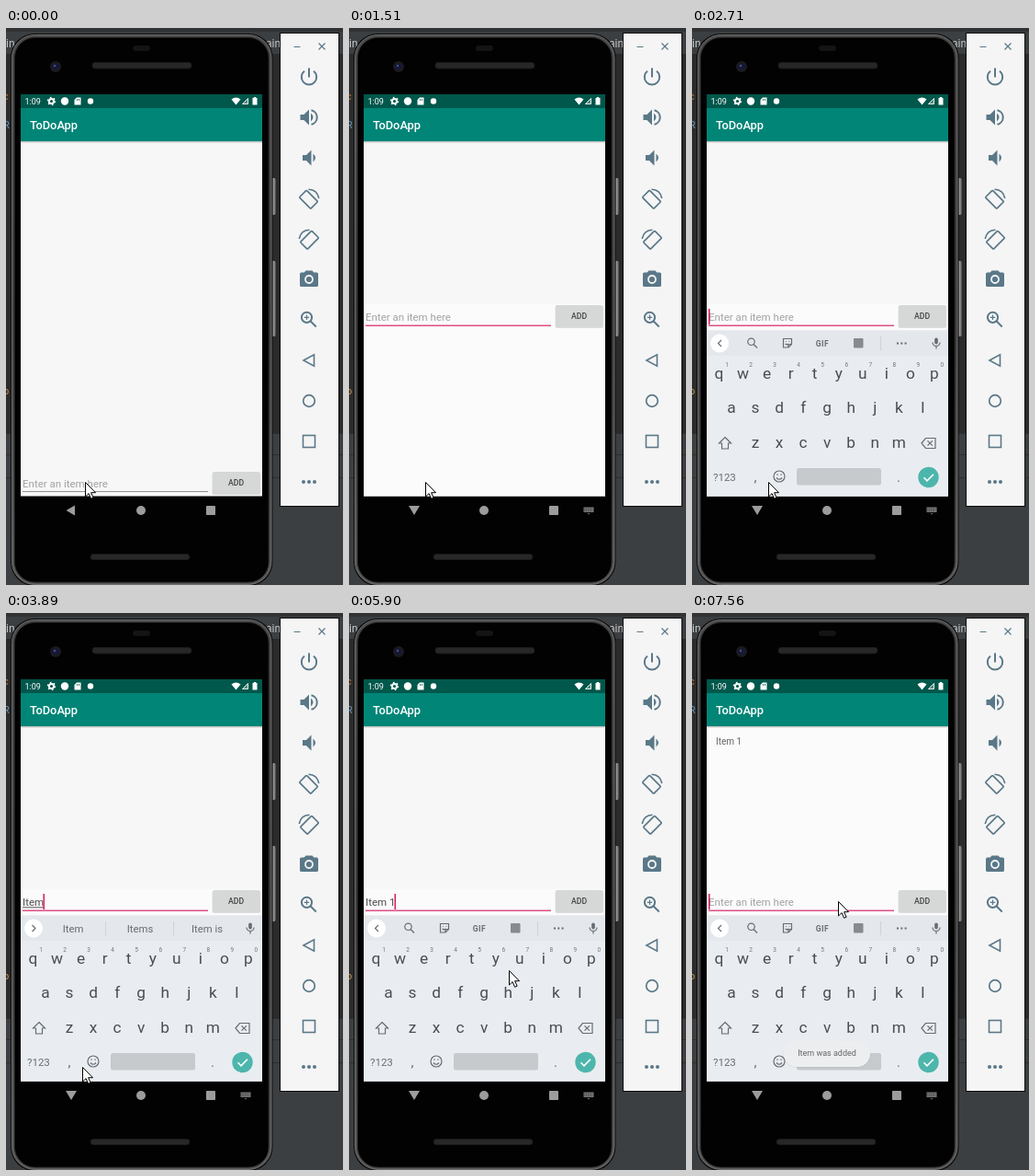
Write an HTML page that moves like this. It is 367 by 605 pixels and loops after 8 s.

```html
<!DOCTYPE html>
<html lang="en">
<head>
<meta charset="utf-8">
<title>To-do list demo</title>
<style>
  html, body { margin: 0; width: 100%; height: 100%; overflow: hidden; background: #3c3f41; }
  svg { display: block; width: 367px; height: 605px; }
  text { font-family: Roboto, "Noto Sans", sans-serif; }
  .mid { text-anchor: middle; }
  .line { fill: none; stroke: currentColor; stroke-width: 2; }
  .thin { fill: none; stroke: currentColor; stroke-width: 1.2; }
  .fill { fill: currentColor; }
  .tools { color: #5a7888; }
  .kb { color: #666d71; }
  .nav { color: #9c9c9c; }
  .code { font: 11px "Noto Sans Mono", monospace; }
</style>
</head>
<body>
<svg viewBox="0 0 367 605">
  <defs>
    <clipPath id="screen"><rect x="16" y="72" width="263" height="436.500"/></clipPath>
    <clipPath id="btn"><rect x="225" y="482" width="51.500" height="24" rx="1.500"/></clipPath>
    <linearGradient id="rim" x2="0" y2="1">
      <stop offset="0" stop-color="#4a4a4a"/><stop offset=".5" stop-color="#3c3c3c"/>
      <stop offset="1" stop-color="#565656"/>
    </linearGradient>
    <linearGradient id="key" x2="1" y2="0">
      <stop offset="0" stop-color="#333"/><stop offset=".6" stop-color="#999"/><stop offset="1" stop-color="#444"/>
    </linearGradient>
    <linearGradient id="drop" x2="0" y2="1">
      <stop offset="0" stop-color="#000" stop-opacity=".25"/><stop offset="1" stop-color="#000" stop-opacity="0"/>
    </linearGradient>
  </defs>

  <!-- editor behind the phone -->
  <rect width="367" height="605" fill="#3c3f41"/>
  <rect y="28" width="367" height="412" fill="#2b2b2b"/>
  <rect width="367" height="4" fill="#303234"/>
  <path d="M0 440.500H367M0 463.500H367M0 488.500H367" stroke="#2c2e30"/>
  <g font-size="12" fill="#c4c6c8">
    <text x="0" y="21">in</text><text x="283" y="21">ain</text>
  </g>
  <g class="code">
    <text x="-3" y="78" fill="#cc7832">c</text>
    <text x="-3" y="109" fill="#6897bb">R</text>
    <text x="-3" y="262" fill="#d04040">.</text>
    <text x="-3" y="398" fill="#cc9a4a">o</text>
  </g>

  <!-- phone body -->
  <rect x="288" y="163" width="6" height="40" rx="2" fill="url(#key)"/>
  <rect x="288" y="253" width="6" height="82" rx="2" fill="url(#key)"/>
  <rect x="5" y="6" width="285.500" height="600" rx="26" fill="#0c0c0c"/>
  <rect x="6.500" y="7.500" width="282.500" height="597" rx="25" fill="url(#rim)" stroke="#6e6e6e"/>
  <rect x="9.500" y="10.500" width="276.500" height="591.500" rx="22" fill="#020202" stroke="#1c1c1c"/>
  <rect x="138" y="19" width="19" height="6" rx="3" fill="#141416"/>
  <circle cx="54" cy="42" r="6" fill="#1b1b1f"/>
  <circle cx="54" cy="42" r="3.500" fill="#15183a"/>
  <circle cx="53" cy="41" r="1.200" fill="#4a5288"/>
  <rect x="94" y="37.500" width="108" height="6.500" rx="3" fill="#272727" stroke="#1a1a1a"/>
  <rect x="92" y="571.500" width="108" height="6" rx="3" fill="#272727" stroke="#1a1a1a"/>

  <!-- app -->
  <g clip-path="url(#screen)">
    <rect x="16" y="72" width="263" height="437" fill="#f7f7f7"/>
    <rect data-on="1230-6710" x="16" y="300" width="263" height="209" fill="#fbfbfb"/>
    <rect data-on="6710-8000" x="16" y="122" width="263" height="387" fill="#fbfbfb"/>
    <rect x="16" y="123" width="263" height="2.500" fill="url(#drop)"/>
    <rect x="16" y="72" width="263" height="15" fill="#00574b"/>
    <rect x="16" y="87" width="263" height="36" fill="#008577"/>
    <g fill="#fff" color="#fff">
      <text x="20.500" y="82.700" font-size="9">1:09</text>
      <circle cx="49.500" cy="79.500" r="2.600" class="line"/>
      <circle cx="49.500" cy="79.500" r="4" class="line" stroke-dasharray="1.600 2.590" style="stroke-width:1.500"/>
      <circle cx="64" cy="79.500" r="4.200"/>
      <path d="M77 75.500h4.500v8h-7v-5.500z"/>
      <path d="M77.500 77v2M79.500 77v2" stroke="#00574b" stroke-width=".8"/>
      <circle cx="92" cy="79.500" r="3.200"/>
      <path d="M245.500 77.500q5-4 10 0l-5 6z"/>
      <path d="M263.500 76.500v6h-6z" fill-opacity=".3" stroke="#fff" stroke-width=".9"/>
      <path d="M268.500 76h1.300v-1h2.400v1h1.300v7.500h-5z"/>
      <text x="26" y="109.700" font-size="12.800" font-weight="500">ToDoApp</text>
    </g>
    <text data-on="6710-8000" x="26" y="142.500" font-size="10" fill="#666">Item 1</text>

    <g id="row">
      <rect data-on="0-560" x="18" y="503" width="202" height="1" fill="#909090"/>
      <rect data-on="560-8000" x="18" y="503.500" width="202" height="1.500" fill="#de4f85"/>
      <text data-on="0-3240 6710-8000" x="18" y="499" font-size="11.500" fill="#a3a3a3">Enter an item here</text>
      <g font-size="11.500" fill="#4c4c4c">
        <text data-on="3240-4940" x="18" y="499">Item</text>
        <text data-on="4940-6710" x="18" y="499">Item 1</text>
        <rect data-on="3240-4820" x="18" y="500.300" width="23" height="1" fill="#555"/>
      </g>
      <rect id="caret" y="486" width="1.500" height="17" fill="#d81b60"/>
      <rect x="224.500" y="483" width="52.500" height="24" rx="2" fill="#000" opacity=".12"/>
      <rect x="225" y="482" width="51.500" height="24" rx="1.500" fill="#d6d7d7"/>
      <g clip-path="url(#btn)"><circle id="ripple" cx="251" cy="494.500" fill="#000" opacity=".07"/></g>
      <text class="mid" x="250.500" y="497.200" font-size="8.700" font-weight="500" fill="#444">ADD</text>
    </g>

    <g id="kb" class="kb">
      <rect x="16" y="328.500" width="263" height="181" fill="#e9edf1"/>
      <rect x="16" y="328.500" width="263" height="27.500" fill="#e4e7eb"/>
      <circle cx="30" cy="342.500" r="10" fill="#fff"/>
      <path data-on="0-3240 4820-8000" class="thin" d="M32 339l-3.500 3.500 3.500 3.500"/>
      <path data-on="3240-4820" class="thin" d="M28.500 339l3.500 3.500-3.500 3.500"/>
      <g data-on="0-3240 4820-8000">
        <circle cx="64.500" cy="340.800" r="3.700" class="thin"/><path class="thin" d="M67 343.500l4 4"/>
        <path class="thin" d="M99.500 337.500h9v6l-3.500 3.500h-5.500zM105 347v-3.500h3.500M102 340.500h.8M105.500 340.500h.8M101.700 343q1.500 1.500 3 0"/>
        <text class="mid fill" x="142" y="345.600" font-size="8.500" font-weight="700" letter-spacing=".5">GIF</text>
        <rect class="fill" x="176" y="337" width="10.500" height="10.500" rx="1" opacity=".75"/>
        <path d="M205.500 335v15" stroke="#cfd3d7"/>
        <path class="fill" d="M223 341.500h2v2h-2zM227.300 341.500h2v2h-2zM231.600 341.500h2v2h-2z"/>
      </g>
      <g data-on="3240-4820" font-size="11.300" class="mid fill">
        <text x="73" y="346.500">Item</text><text x="146" y="346.500">Items</text><text x="219" y="346.500">Item is</text>
        <path d="M108.500 335v15M182.500 335v15" stroke="#cfd3d7"/>
      </g>
      <rect class="fill" x="264.200" y="336.500" width="3.600" height="7" rx="1.800"/>
      <path class="thin" d="M262 341.500a4 4 0 0 0 8 0M266 345.500v3"/>
      <g id="keys" class="mid" fill="#484e52" font-size="17.300"></g>
      <path class="thin" d="M36 444.500l6.500 6.500h-3v6h-7v-6h-3z"/>
      <path class="thin" d="M250 451l4.500-5.500h10.500v11h-10.500zM256.500 448.300l5.400 5.400M261.900 448.300l-5.400 5.400"/>
      <text class="fill" x="23" y="491.500" font-size="11.500">?123</text>
      <g class="mid fill" font-size="15"><text x="69" y="492.500">,</text><text x="225" y="492.500">.</text></g>
      <circle cx="95" cy="487" r="6" class="thin"/>
      <path class="thin" d="M92.300 485.200h1.400M96.300 485.200h1.400M92 488.500q3 3.500 6 0"/>
      <rect x="114" y="478" width="92" height="18.500" rx="2.500" fill="#c6cacd"/>
      <circle cx="257.500" cy="488" r="11.200" fill="#4db6ac"/>
      <path d="M252.500 488.300l3.500 3.500 7-7" fill="none" stroke="#fff" stroke-width="1.600"/>
    </g>

    <g id="toast">
      <rect x="99.500" y="465.500" width="95" height="28.500" rx="14" fill="#000" opacity=".05"/>
      <rect x="100" y="464.500" width="94" height="28.500" rx="14" fill="#eceef0"/>
      <text class="mid" x="147" y="481.300" font-size="9" fill="#666">Item was added</text>
    </g>
  </g>

  <!-- navigation bar -->
  <g class="nav fill">
    <path data-on="0-1510" d="M65.500 524l9.500-5.500v11z"/>
    <path data-on="1510-8000" d="M65 519h12l-6 10z"/>
    <circle cx="147" cy="524" r="5"/>
    <rect x="218" y="519" width="10" height="10" rx=".8"/>
    <g data-on="1510-8000">
      <rect x="255.500" y="520.500" width="11" height="5.500" fill="#777"/>
      <path d="M256.500 522.300h9M256.500 524.300h9" stroke="#111" stroke-width=".8" stroke-dasharray=".8 1"/>
      <path d="M259.500 527h3l-1.500 1.500z" fill="#777"/>
    </g>
  </g>

  <!-- side tool panel -->
  <rect x="298.500" y="5.500" width="64" height="514" fill="#f5f5f5" stroke="#0a0a0a"/>
  <g class="tools">
    <path class="thin" d="M313.500 20.500h7M340.500 16.500l7 7M347.500 16.500l-7 7"/>
    <path class="line" d="M330 43.500v10M325 46.800a8.200 8.200 0 1 0 10 0"/>
    <g id="speaker">
      <path class="fill" d="M320.500 94h4l5.500-5.500v17l-5.500-5.500h-4z"/>
      <path class="fill" d="M332 92.500q5 4.500 0 9z"/>
    </g>
    <path class="line" d="M332.500 89.200a8 8 0 0 1 0 15.600"/>
    <use href="#speaker" x="2.500" y="44"/>
    <g id="turn">
      <rect class="line" x="324" y="177.500" width="11" height="17.500" rx="1" transform="rotate(-45 329.500 186.250)" style="stroke-width:1.700"/>
      <path class="line" d="M329.500 175.200q9.500.3 11.300 9.800" style="stroke-width:1.600"/>
    </g>
    <use href="#turn" transform="matrix(-1 0 0 1 660 44)"/>
    <path class="fill" d="M326.500 263.500h7l1.800 2h3q1.700 0 1.700 1.700v12.300q0 1.500-1.700 1.500h-16.600q-1.700 0-1.700-1.500v-12.300q0-1.700 1.700-1.700h3z"/>
    <circle cx="330" cy="273" r="4" fill="none" stroke="#f5f5f5" stroke-width="1.800"/>
    <circle class="line" cx="327.500" cy="314.300" r="5.600"/>
    <path class="line" d="M331.700 318.500l6 6"/>
    <path class="thin" d="M324.800 314.300h5.400M327.500 311.600v5.400"/>
    <path class="line" d="M324 361l11.500-6.200v12.400z" style="stroke-width:1.600"/>
    <circle class="line" cx="330" cy="405" r="6.300" style="stroke-width:1.700"/>
    <rect class="line" x="323.500" y="442.500" width="13" height="13" style="stroke-width:1.600"/>
    <circle class="fill" cx="324" cy="493" r="2"/><circle class="fill" cx="330" cy="493" r="2"/><circle class="fill" cx="336" cy="493" r="2"/>
  </g>

  <path id="cursor" d="M.5.500v15.500l3.600-3.400 2.500 5.700 2.500-1.100-2.500-5.500h4.900z" fill="#fff" stroke="#000"/>
</svg>
<script>
  const LOOP = 8000;
  const $ = id => document.getElementById(id);

  function addText(str, x, y, attrs = {}) {
    const el = document.createElementNS("http://www.w3.org/2000/svg", "text");
    el.textContent = str;
    for (const [k, v] of Object.entries({ x, y, ...attrs })) el.setAttribute(k, v);
    $("keys").append(el);
  }

  [["qwertyuiop", 29.5, 380.5], ["asdfghjkl", 43, 418], ["zxcvbnm", 69, 456]].forEach(([row, x0, y], r) => {
    [...row].forEach((ch, i) => {
      const x = x0 + i * 26.05;
      addText(ch, x, y);
      if (!r) addText((i + 1) % 10, x + 8.5, 367.5, { "font-size": 6.5, fill: "#70777b" });
    });
  });

  // Held values: [start, ...values]
  const cursorSteps = [
    [0, 86, 493], [120, 83, 493], [5900, 174, 388], [6020, 215, 351], [6170, 241, 326],
    [6290, 254, 314], [6440, 257, 312], [6560, 257, 310], [6830, 245, 311], [6980, 187, 312], [7100, 159, 313]
  ];
  const caretSteps = [
    [0, 0], [680, 18], [1230, 0], [1630, 18], [2160, 0], [2710, 18], [3240, 40.5], [3490, 0],
    [3890, 40.5], [4420, 0], [4820, 43], [4940, 49.5], [5500, 0], [5900, 49.5], [6440, 0],
    [6710, 18], [7100, 0], [7560, 18]
  ];
  const kbSteps = [[0, 181], [1630, 80], [1750, 0]];
  const toastSteps = [[0, 0], [6830, .5], [6980, 1]];
  const rippleSteps = [[0, 0], [6440, 8], [6560, 13], [6710, 26], [6830, 34], [6980, 0]];

  const held = (steps, t) => steps.findLast(s => s[0] <= t).slice(1);

  const timed = [...document.querySelectorAll("[data-on]")].map(el => ({
    el, spans: el.dataset.on.split(" ").map(s => s.split("-").map(Number))
  }));

  function draw(t) {
    for (const { el, spans } of timed) {
      el.style.display = spans.some(([a, b]) => t >= a && t < b) ? "" : "none";
    }
    const [caret] = held(caretSteps, t);
    $("caret").setAttribute("x", caret);
    $("caret").style.display = caret ? "" : "none";
    $("row").setAttribute("transform", `translate(0 ${t < 1230 ? 0 : -181})`);
    $("kb").setAttribute("transform", `translate(0 ${held(kbSteps, t)})`);
    $("toast").setAttribute("opacity", held(toastSteps, t));
    $("ripple").setAttribute("r", held(rippleSteps, t));
    $("cursor").setAttribute("transform", `translate(${held(cursorSteps, t).join(" ")})`);
  }

  const start = performance.now();
  function tick() {
    draw((performance.now() - start) % LOOP);
    requestAnimationFrame(tick);
  }
  tick();
</script>
</body>
</html>
```
